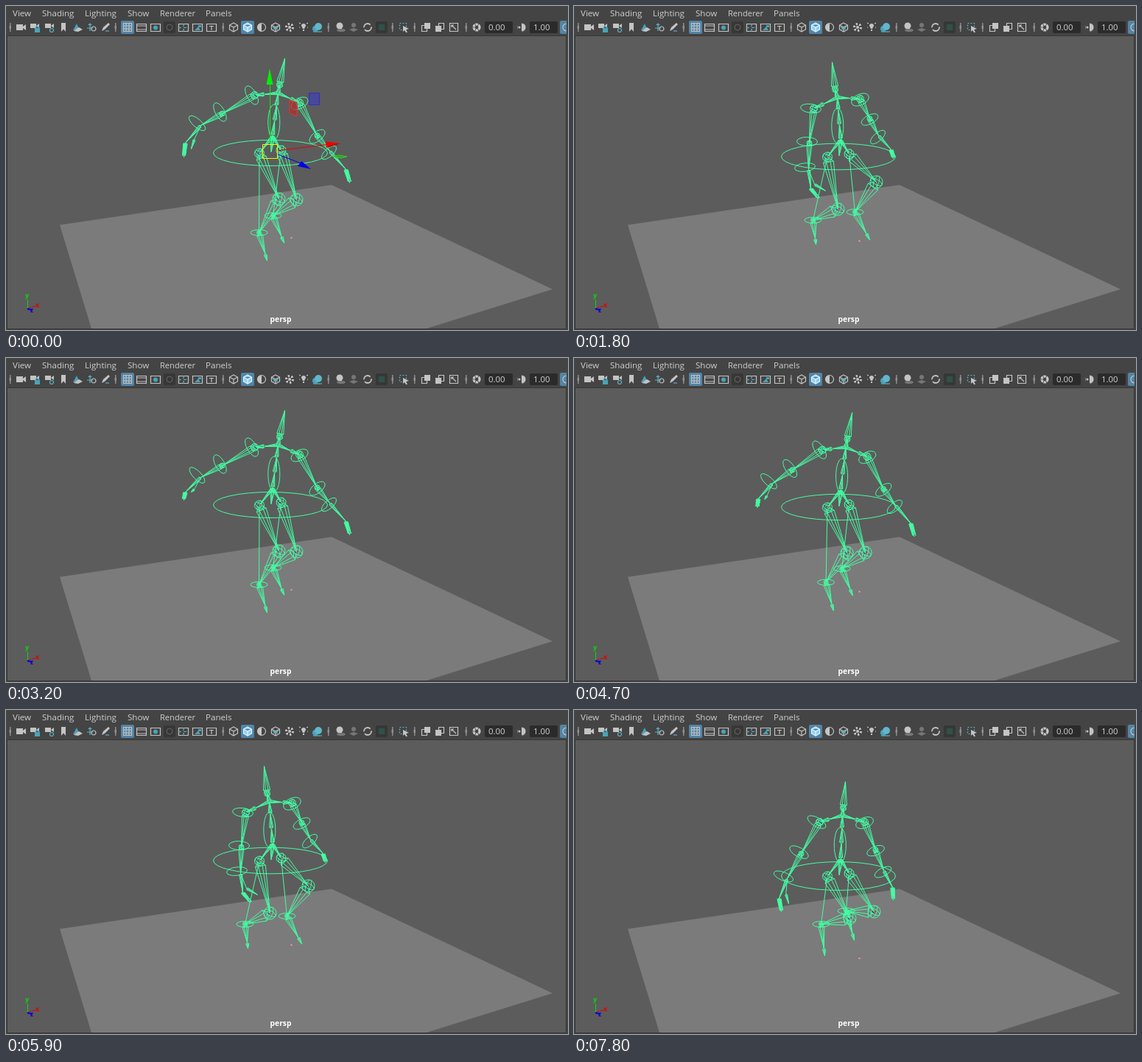
An HTML page that plays this animation: 763x441 px, repeating every 8000 ms.

```html
<!DOCTYPE html>
<html lang="en">
<head>
<meta charset="utf-8">
<title>Rig viewport</title>
<style>
  html, body { margin: 0; width: 100%; height: 100%; overflow: hidden; background: #444; }
  svg { display: block; width: 763px; height: 441px; }
  text { font-family: "Open Sans", "Noto Sans", sans-serif; }
  .menu { font-size: 11.6px; fill: #cfcfcf; }
  .field { font-size: 11.4px; fill: #d2d2d2; }
  .line { fill: none; stroke: #c4c4c4; stroke-width: 1.2; }
  .solid { fill: #c4c4c4; }
  .teal { fill: #4aa3b8; }
  .tealLine { fill: none; stroke: #5ab4c8; stroke-width: 1.2; }
  .rig { fill: none; stroke-width: 1; }
</style>
</head>
<body>
<svg viewBox="0 0 763 441">
  <rect width="763" height="441" fill="#444"/>
  <rect x="1" y="40" width="760" height="400" fill="#363636"/>
  <rect x="2" y="41" width="758" height="398" fill="#5c5c5c"/>
  <path d="M73 298L442 243.500L742 385.500L571 439H116Z" fill="#7b7b7b"/>

  <g class="menu">
    <text x="9" y="14">View</text>
    <text x="49" y="14">Shading</text>
    <text x="107" y="14">Lighting</text>
    <text x="165" y="14">Show</text>
    <text x="209" y="14" font-size="11.100">Renderer</text>
    <text x="271" y="14">Panels</text>
  </g>

  <g id="grips" fill="#8f8f8f"></g>

  <!-- camera tools -->
  <g transform="translate(20 29)"><path class="solid" d="M-6-4H3V4H-6ZM3-1L7-4V4L3 1Z"/></g>
  <g transform="translate(39 29)"><path class="solid" d="M-6-5H2V1H-6ZM2-2L6-5V1Z"/><path class="teal" d="M0 1H7V7H0Z"/><path class="tealLine" d="M1.500 1V-1H5.500V1"/></g>
  <g transform="translate(59 29)"><path class="solid" d="M-6-5H2V1H-6ZM2-2L6-5V1Z"/><circle class="tealLine" cx="3" cy="4" r="2.500"/></g>
  <path class="solid" d="M75 23H81V35L78 31.500L75 35Z"/>
  <g transform="translate(97 29)"><path class="teal" d="M-6 4L-1-5L3 4Z"/><path class="solid" d="M-5 5L2 0L7 3L1 6Z"/></g>
  <g transform="translate(116 29)"><path class="tealLine" d="M-6 1H2M-2-5V5M-4-3L-2-5L0-3"/><circle class="line" cx="3" cy="2" r="3"/></g>
  <g transform="translate(135 29)"><path class="solid" d="M-5 5L-3 0L4-6L6-4L-1 3Z"/><path class="tealLine" d="M0 5H5"/></g>

  <!-- gates -->
  <rect x="156" y="20" width="18" height="18" rx="2" fill="#5285a6"/>
  <path class="line" stroke="#eee" d="M159.500 23.500H170.500V34.500H159.500ZM163 23V35M167 23V35M159 27H171M159 31H171"/>
  <path class="line" d="M177.500 24.500H190.500V34.500H177.500ZM178 27H190M178 32H190"/>
  <path class="line" d="M196.500 24.500H209.500V34.500H196.500Z"/><circle class="teal" cx="203" cy="29.500" r="3"/>
  <rect x="214" y="21" width="16" height="16" rx="2" fill="#373737"/><circle cx="222" cy="29" r="4" fill="none" stroke="#666"/>
  <path class="line" d="M234.500 24.500H247.500V34.500H234.500Z"/><path class="tealLine" d="M241 24V35M234 29.500H248" stroke-dasharray="4 3"/>
  <path class="line" d="M253.500 24.500H266.500V34.500H253.500Z"/><path class="teal" d="M256 33L261 28L264 33ZM261 26H265V29H261Z"/>
  <path class="line" d="M272.500 24.500H285.500V34.500H272.500ZM276 27.500H282M279 27V33"/>

  <!-- shading modes -->
  <rect x="319" y="20" width="18" height="18" rx="2" fill="#5285a6"/>
  <g id="cubes"></g>
  <circle class="line" cx="347" cy="29" r="5.500"/><path class="solid" d="M347 23.500A5.500 5.500 0 0 0 347 34.500Z"/>
  <path class="tealLine" d="M362 28L366 31L370 28M363 32L366 30L369 32"/>
  <circle cx="385" cy="29" r="4.500" fill="none" stroke="#c8c8c8" stroke-width="3" stroke-dasharray="2.300 2.300"/><circle cx="385" cy="29" r="2" class="solid"/>
  <path class="solid" d="M401 27A3 3 0 1 1 407 27L405 31H403ZM403 32H405V34H403Z"/><path class="line" d="M398 23L400 24M398 29H399M409 29H410M408 24L410 23"/>
  <circle class="teal" cx="420" cy="31" r="4"/><circle cx="424" cy="28" r="5" fill="#62b6c9"/><path class="tealLine" d="M417 35H429"/>

  <!-- effects -->
  <circle class="solid" cx="453" cy="27" r="4.500"/><ellipse cx="455" cy="33" rx="6" ry="2" fill="#777"/>
  <path d="M466 32L472 30L478 32L472 35Z" fill="#777"/><circle cx="472" cy="26" r="3" fill="#777"/>
  <circle cx="491" cy="29" r="5" fill="none" stroke="#c4c4c4" stroke-width="1.800" stroke-dasharray="12 3"/>
  <rect x="502" y="21" width="16" height="16" rx="2" fill="#373737"/><rect x="506" y="25" width="8" height="8" fill="#2f514a"/>
  <path class="tealLine" d="M534.500 23.500H543.500V32.500H534.500Z" stroke-dasharray="2 2"/><path class="solid" d="M539 27L547 31L543 32L545 36L543 36L541 33L539 35Z"/>
  <path class="line" d="M564.500 26.500H571.500V34.500H564.500Z"/><path class="solid" d="M568 23H576V31H568Z"/>
  <path class="solid" d="M583 27H591V35H583Z"/><path class="line" d="M587.500 23.500H594.500V31.500H587.500Z"/>
  <path class="line" d="M602.500 23.500H613.500V34.500H602.500ZM605 26L611 32M605 29V26H608"/>

  <!-- exposure and gamma -->
  <circle cx="639" cy="29" r="4" fill="none" stroke="#c8c8c8" stroke-width="3.200" stroke-dasharray="3.400 .8"/>
  <rect x="650" y="21" width="38" height="16" rx="2" fill="#2b2b2b"/>
  <text class="field" x="655" y="33">0.00</text>
  <circle class="line" cx="700" cy="29" r="5"/><path class="solid" d="M700 24A5 5 0 0 1 700 34Z"/><path d="M695 22H700V36H695Z" fill="#444"/><circle class="solid" cx="697" cy="29" r="1.500"/>
  <rect x="711" y="21" width="38" height="16" rx="2" fill="#2b2b2b"/>
  <text class="field" x="716" y="33">1.00</text>
  <path d="M754 20H761V38H754Q752 38 752 36V22Q752 20 754 20Z" fill="#5285a6"/><path class="line" d="M761 24A5 5 0 0 0 761 34"/>

  <!-- world axes -->
  <g font-size="9" font-weight="700">
    <path d="M29.500 412V400" stroke="#00e000"/><text x="26" y="397" fill="#00e000">y</text>
    <path d="M29 412L40 408.500" stroke="#e00000"/><text x="40" y="410" fill="#e00000">x</text>
    <path d="M29 412L35 414" stroke="#0000e0" stroke-width="2"/><text x="33" y="417" font-size="8" fill="#0000e0">z</text>
  </g>
  <text x="373" y="430" font-size="10.300" font-weight="700" fill="#fff" text-anchor="middle">persp</text>

  <g transform="translate(.5 .5)">
    <path id="bones" class="rig" stroke="#43ffa3"/>
    <path id="blue" class="rig" stroke="#1010e8" stroke-width="1.500"/>
    <path id="red" class="rig" stroke="#e02020"/>
    <rect id="pin" x="386" width="2" height="2" fill="#ff9a9a"/>
  </g>

  <g id="handles" fill="none">
    <path d="M385 128L395 131V150L385 146Z" fill="#b03030" fill-opacity=".75" stroke="#d83a30"/>
    <path d="M411.500 118.500H425.500V134.500H411.500Z" fill="#48489a" stroke="#3030b8"/>
    <path d="M444 205L452 203L463 205L455 207Z" fill="#3c9a30" stroke="#30d020"/>
    <path d="M358.500 188V105" stroke="#00f000"/>
    <path d="M353.500 107L358 85L362.500 107Z" fill="#00f000"/>
    <path d="M368 197L436 188.500" stroke="#e80000"/>
    <path d="M434 184.500L454 187L435 193Z" fill="#f00000"/><path d="M441 190L454 187L435 193Z" fill="#700"/>
    <path d="M368 201.500L400 214" stroke="#0000f0"/>
    <path d="M396 218L401 211L414 222Z" fill="#0000e8"/>
    <path d="M348.500 188.500H368.500V207.500H348.500Z" stroke="#f4f400"/>
  </g>
</svg>

<script>
const $ = id => document.getElementById(id);

$('grips').innerHTML = [5, 148, 294, 437, 524, 554, 624].map(x =>
  `<rect x="${x}" y="23" width="1.500" height="12"/><rect x="${x - .5}" y="27" width="2.500" height="4"/>`).join('');
$('cubes').innerHTML = [309, 328, 366].map(x =>
  `<path class="line" transform="translate(${x} 29)" d="M0-6L5.500-3V3L0 6L-5.500 3V-3ZM-5.500-3L0 0L5.500-3M0 0V6"
    ${x === 328 ? 'style="fill:#8fd0ea;stroke:#e4f6ff"' : ''}/>`).join('');

// Each pose: root height; head, skull, neck; left arm, right arm
// (shoulder, elbow, wrist, knuckle, tip); left leg, right leg (knee, ankle, toe).
const rest = [198, 378,71, 371,107, 369,118,
  337,121, 293,146, 264,162, 243,182, 241,193,  398,131, 422,176, 439,197, 461,222, 466,240,
  370,262, 343,308, 354,346,  394,263, 362,285, 377,322];
const brake = [224, 368,97, 365,133, 364,143,
  333,152, 308,195, 289,229, 278,256, 281,274,  394,152, 409,190, 420,218, 432,241, 433,258,
  374,283, 335,291, 340,334,  407,274, 369,273, 380,313];
const lift = [221, 363,93, 362,129, 362,140,
  330,150, 310,196, 296,230, 288,259, 294,276,  394,148, 406,182, 417,210, 430,232, 432,247,
  374,285, 332,292, 337,334,  410,261, 369,259, 383,300];
const stride = [203, 350,76, 354,113, 357,124,
  325,139, 319,186, 318,222, 321,248, 331,262,  388,126, 401,153, 413,176, 430,195, 433,207,
  358,276, 324,291, 328,324,  410,239, 381,280, 401,318];
const tall = [199, 368,71, 366,107, 365,118,
  333,128, 318,172, 311,208, 308,234, 314,252,  393,128, 404,162, 415,190, 428,212, 430,227,
  366,264, 338,303, 346,346,  401,250, 373,277, 388,314];
const crouch = [225, 367,98, 364,133, 364,144,
  333,153, 319,198, 311,234, 309,260, 312,277,  393,153, 402,187, 413,214, 424,236, 427,251,
  370,290, 330,288, 333,329,  407,269, 376,301, 390,335];
const rise = [223, 371,96, 367,132, 366,143,
  335,151, 316,195, 305,231, 300,258, 303,275,  395,153, 403,192, 413,222, 425,243, 427,260,
  372,284, 331,281, 335,324,  404,274, 373,295, 383,329];
const cycle = [rest, brake, lift, stride, tall, crouch, rise, rest];
const opening = rest.map((v, i) => i === 14 ? 186 : i === 16 ? 205 : v);

// Time in ms and place in the cycle; the timeline is scrubbed to and fro.
const scrub = [[0,0],[900,0],[1000,.5],[1100,1],[1200,1],[1300,1.6],[1400,2.25],[1500,2.25],
  [1600,2.5],[1800,3],[2000,4],[2300,5],[2400,5.4],[2600,6],[2900,6.6],[3200,7],[4400,7],
  [4500,6.95],[4600,6.95],[4700,6.88],[4900,6.67],[5000,6.67],[5100,6.45],[5300,6],[5400,6],
  [5500,5.5],[5900,3],[6000,3],[6100,2.85],[6300,2.4],[6400,2.4],[6500,2],[6900,0],[7400,0],
  [7800,1],[8000,1]];

const mix = (a, b, k) => a + (b - a) * k;
const between = (a, b, k) => [mix(a[0], b[0], k), mix(a[1], b[1], k)];
const shift = ([x, y], dx, dy) => [x + dx, y + dy];
const num = v => v.toFixed(1);
const line = (...pts) => 'M' + pts.map(p => p.map(num).join(' ')).join('L');
const heading = (a, b) => Math.atan2(b[1] - a[1], b[0] - a[0]);

function oval([x, y], rx, ry, angle = 0) {
  const dx = Math.cos(angle) * rx, dy = Math.sin(angle) * rx;
  const arc = s => `a${num(rx)} ${num(ry)} ${num(angle * 180 / Math.PI)} 1 0 ${num(2 * dx * s)} ${num(2 * dy * s)}`;
  return `M${num(x - dx)} ${num(y - dy)}` + arc(1) + arc(-1);
}
const ball = (p, r) => oval(p, r, r) + oval(p, r, r * .4, .5) + oval(p, r, r * .4, 1.9);

// Wire pyramid: wide next to a, pointed at b.
function bone(a, b, w) {
  const t = heading(a, b), c = Math.cos(t), s = Math.sin(t);
  const base = k => [a[0] + c * w - s * w * k, a[1] + s * w + c * w * k];
  return line(a, base(-1), b, base(1), a) + line(base(-1), base(1)) + line(base(-.4), b, base(.4));
}

function arm([shoulder, elbow, wrist, knuckle, tip], neck, left) {
  const joint = between(neck, shoulder, .55), size = left ? 14 : 12.5;
  const ring = (p, q, dx, dy, ry) => oval(shift(p, dx, dy), size, ry, heading(p, q) - Math.PI / 2);
  let d = bone(neck, joint, 2) + bone(joint, shoulder, 2.5) + ball(shoulder, 5) + ball(elbow, 3.5)
    + bone(shoulder, elbow, 4.5) + bone(elbow, wrist, 3.5) + bone(wrist, knuckle, 2);
  for (const k of [-1.5, 0, 1.5]) d += bone(shift(knuckle, k, 0), shift(tip, k * 1.3, -Math.abs(k)), 1.2);
  if (left) {
    const mid = shift(between(wrist, knuckle, .7), 6, 2);
    d += line(wrist, mid) + bone(mid, shift(tip, 10, -11), 1.5);
    return d + ring(shoulder, elbow, -4, 0, 6) + ring(elbow, wrist, -3, -2, 6) + ring(wrist, knuckle, -5, -3, 5.5);
  }
  return d + ring(shoulder, elbow, 0, 1, 7) + ring(elbow, wrist, 0, 1, 6) + ring(wrist, knuckle, -1, 2, 5.5);
}

function leg(hip, [knee, ankle, toe]) {
  const sole = between(ankle, toe, .76);
  return ball(hip, 6.5) + ball(knee, 8.5) + bone(hip, knee, 7) + bone(knee, ankle, 8)
    + bone(ankle, sole, 4) + bone(sole, toe, 2) + line(hip, ankle)
    + oval(ankle, 11.5, 4) + ball(ankle, 3);
}

function drawPose(pose) {
  const rootY = pose[0], p = [];
  for (let i = 1; i < pose.length; i += 2) p.push([pose[i], pose[i + 1]]);
  const [head, skull, neck] = p;
  const root = [359.5, rootY], pelvis = [361.5, rootY - 21.5];
  const hips = [[343.5, rootY + 2], [373, rootY - 2]];
  const spine = [0, .35, .7, 1].map(k => between(pelvis, neck, k));

  let d = oval([358.5, rootY + 1.5], 77.5, 17.5 + (rootY - 198) * .075);
  d += oval([(pelvis[0] + neck[0]) / 2 - 2, pelvis[1] - 19], 8, 24, 0)
    + bone(pelvis, root, 3) + hips.map(h => bone(pelvis, h, 2)).join('')
    + [0, 1, 2].map(i => bone(spine[i], spine[i + 1], 2.5)).join('')
    + bone(neck, skull, 2.5) + ball(skull, 4) + bone(skull, head, 4.5)
    + arm(p.slice(3, 8), neck, true) + arm(p.slice(8, 13), neck, false)
    + leg(hips[0], p.slice(13, 16)) + leg(hips[1], p.slice(16, 19));
  $('bones').setAttribute('d', d);

  const marks = [hips[0], hips[1], p[13], p[16]];
  $('blue').setAttribute('d', marks.map(m => line(shift(m, -3, -1), shift(m, 0, 2))).join('')
    + line(p[3], shift(p[3], 3, 1)));
  $('red').setAttribute('d', marks.map(m => line(m, shift(m, 3, -1))).join(''));
  $('pin').setAttribute('y', num(314 + (rootY - 198) * .87));
}

function phaseAt(t) {
  const i = scrub.findIndex(([time]) => time > t);
  const [t0, p0] = scrub[i - 1], [t1, p1] = scrub[i];
  return mix(p0, p1, (t - t0) / (t1 - t0));
}

let shown = -1;
function tick() {
  const t = Math.floor(performance.now() % 8000 / 100) * 100;
  if (t !== shown) {
    shown = t;
    const phase = phaseAt(t), i = Math.min(6, Math.floor(phase));
    const from = cycle[i], to = cycle[i + 1];
    drawPose(t < 1000 ? opening : from.map((v, n) => mix(v, to[n], phase - i)));
    $('handles').style.display = t < 1000 ? '' : 'none';
  }
  requestAnimationFrame(tick);
}
tick();
</script>
</body>
</html>
```
